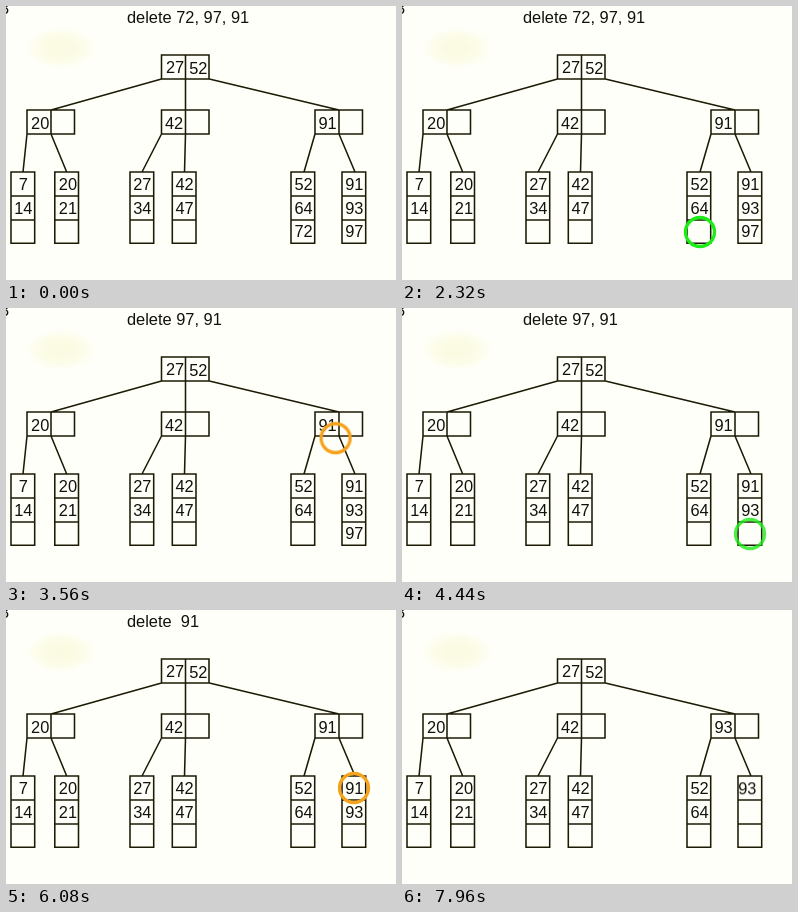
An HTML page that plays this animation: 390 px wide and 274 px high, repeating every 8 s.

```html
<!DOCTYPE html>
<html lang="en">
<head>
<meta charset="utf-8">
<title>B+ tree deletion</title>
<style>
html, body { margin: 0; width: 100%; height: 100%; overflow: hidden; background: #fffffa; }
svg { display: block; width: 390px; height: 274px; }
text { font: 16.4px "Liberation Sans", Arial, sans-serif; fill: #12110a; white-space: pre; }
.num { text-anchor: middle; }
.lines { fill: none; stroke: #1c1a04; stroke-width: 1.55; }

/* Hard changes: each state shows for its share of the 8 s loop */
.step { animation: 8s step-end infinite; }
.title1 { animation-name: until31; }
.title2 { animation-name: from31to60; }
.title3 { animation-name: from60to80; }
.gone72 { animation-name: until29; }
.gone97 { animation-name: until55; }
.gone91 { animation-name: until80; }
.old { animation-name: until90; }
.new { animation-name: from90; }
.glow { animation-name: glow; }
@keyframes until29 { 0% { opacity: 1 } 29%, 100% { opacity: 0 } }
@keyframes until31 { 0% { opacity: 1 } 31%, 100% { opacity: 0 } }
@keyframes until55 { 0% { opacity: 1 } 55%, 100% { opacity: 0 } }
@keyframes until80 { 0% { opacity: 1 } 80%, 100% { opacity: 0 } }
@keyframes until90 { 0% { opacity: 1 } 90.5%, 100% { opacity: 0 } }
@keyframes from90 { 0% { opacity: 0 } 90.5%, 100% { opacity: 1 } }
@keyframes from31to60 { 0% { opacity: 0 } 31% { opacity: 1 } 60%, 100% { opacity: 0 } }
@keyframes from60to80 { 0% { opacity: 0 } 60% { opacity: 1 } 80%, 100% { opacity: 0 } }
@keyframes glow { 0% { opacity: 0 } 84.5% { opacity: 1 } 90.5%, 100% { opacity: 0 } }

.edgeGlow { stroke-dasharray: 42; animation: climb 8s linear infinite; }
@keyframes climb { 0%, 84.5% { stroke-dashoffset: 42 } 86.3%, 100% { stroke-dashoffset: 0 } }

.rise { animation: rise 8s linear infinite; }
@keyframes rise {
  0%, 82% { transform: none }
  84%, 99.49% { transform: translate(0, -23.7px) }
  99.5%, 100% { transform: translate(-3px, -23.7px) }
}

.ring {
  fill: none; stroke: #f5a21c; stroke-width: 3.3;
  animation: path 8s linear infinite, fade 8s linear infinite, tint 8s step-end infinite;
}
@keyframes path {
  0%, 4.5% { transform: translate(192px, 62px) }
  12%, 15.5% { transform: translate(321px, 117px) }
  21%, 22.5% { transform: translate(298px, 178px) }
  26%, 30.99% { transform: translate(298px, 226px) }
  31%, 33.5% { transform: translate(192px, 62px) }
  35% { transform: translate(204px, 73px) }
  41% { transform: translate(325px, 108px) }
  44.5% { transform: translate(329.5px, 130px) }
  48% { transform: translate(348px, 178px) }
  50.5%, 59.99% { transform: translate(348px, 226px) }
  60%, 62% { transform: translate(192px, 62px) }
  63.5% { transform: translate(204px, 73px) }
  68.5% { transform: translate(284px, 93px) }
  70.49% { transform: translate(288px, 93px) }
  70.5%, 72.5% { transform: translate(333px, 128px) }
  76%, 100% { transform: translate(348px, 178px) }
}
@keyframes fade {
  0%, .5% { opacity: 0 }
  2%, 55% { opacity: 1 }
  57.5%, 59.9% { opacity: 0 }
  60.5%, 80.5% { opacity: 1 }
  82%, 100% { opacity: 0 }
}
@keyframes tint {
  0%, 31%, 57.5%, 82%, 100% { stroke: #f5a21c }
  27%, 52%, 77% { stroke: #1cec16 }
}
</style>
</head>
<body>
<svg viewBox="0 0 390 274">
  <defs>
    <radialGradient id="haze">
      <stop offset="0" stop-color="#fafae0"/>
      <stop offset=".6" stop-color="#fcfce8"/>
      <stop offset="1" stop-color="#fffffa"/>
    </radialGradient>
  </defs>
  <ellipse cx="55" cy="42" rx="36" ry="21" fill="url(#haze)"/>
  <text x="-6" y="8">3</text>

  <g class="step glow" fill="#fff21a" stroke="#fff21a">
    <rect x="336" y="166" width="24" height="24" stroke="none"/>
    <path class="edgeGlow" d="M348 166L334 129" fill="none" stroke-width="7"/>
  </g>

  <path class="lines" id="tree"/>
  <g id="numbers"></g>

  <text class="step title1" x="121" y="16.6">delete 72, 97, 91</text>
  <text class="step title2" x="121" y="16.6">delete 97, 91</text>
  <text class="step title3" x="121" y="16.6">delete  91</text>
  <circle class="ring" r="14.5"/>
</svg>
<script>
const SVG = "http://www.w3.org/2000/svg";
const numbers = document.getElementById("numbers");
const outline = [];

function label(value, x, y, classes = "") {
  const text = document.createElementNS(SVG, "text");
  text.setAttribute("class", "num " + classes);
  text.setAttribute("x", x);
  text.setAttribute("y", y);
  text.textContent = value;
  numbers.append(text);
}

const edge = (x1, y1, x2, y2) => outline.push(`M${x1} ${y1}L${x2} ${y2}`);

function indexNode(x, y) {
  outline.push(`M${x} ${y}h47.5v24h-47.5zm24 0v24`);
}

// Each entry is a value, optionally with its animation classes
function leaf(x, entries, shift = 0) {
  outline.push(`M${x} 166h23.7v71.3h-23.7zm0 24h23.7m-23.7 24h23.7`);
  entries.forEach(([value, classes], i) => label(value, x + 12.3 + shift, 184 + 23.7 * i, classes));
}

indexNode(155.5, 49);
label(27, 169, 66.7);
label(52, 192.3, 67.5);

for (const x of [21, 155.5, 309]) indexNode(x, 104);
label(20, 34.2, 122.5);
label(42, 168, 122.5);
label(91, 321.5, 122.5, "step old");
label(93, 321.5, 122.5, "step new");

edge(155.5, 73, 45, 104);
edge(179.5, 73, 179.5, 104);
edge(203.3, 73, 333, 104);
edge(21, 128, 17, 166);
edge(45, 128, 60.7, 166);
edge(155.5, 128, 136, 166);
edge(179.5, 128, 178.5, 166);
edge(309, 128, 298, 166);
edge(333, 128, 349, 166);

leaf(5, [[7], [14]]);
leaf(48.8, [[20], [21]], 0.8);
leaf(124, [[27], [34]]);
leaf(166.3, [[42], [47]]);
leaf(285, [[52], [64], [72, "step gone72"]], 0.3);
leaf(336, [[91, "step gone91"], [93, "rise"], [97, "step gone97"]]);

document.getElementById("tree").setAttribute("d", outline.join(""));
</script>
</body>
</html>
```
